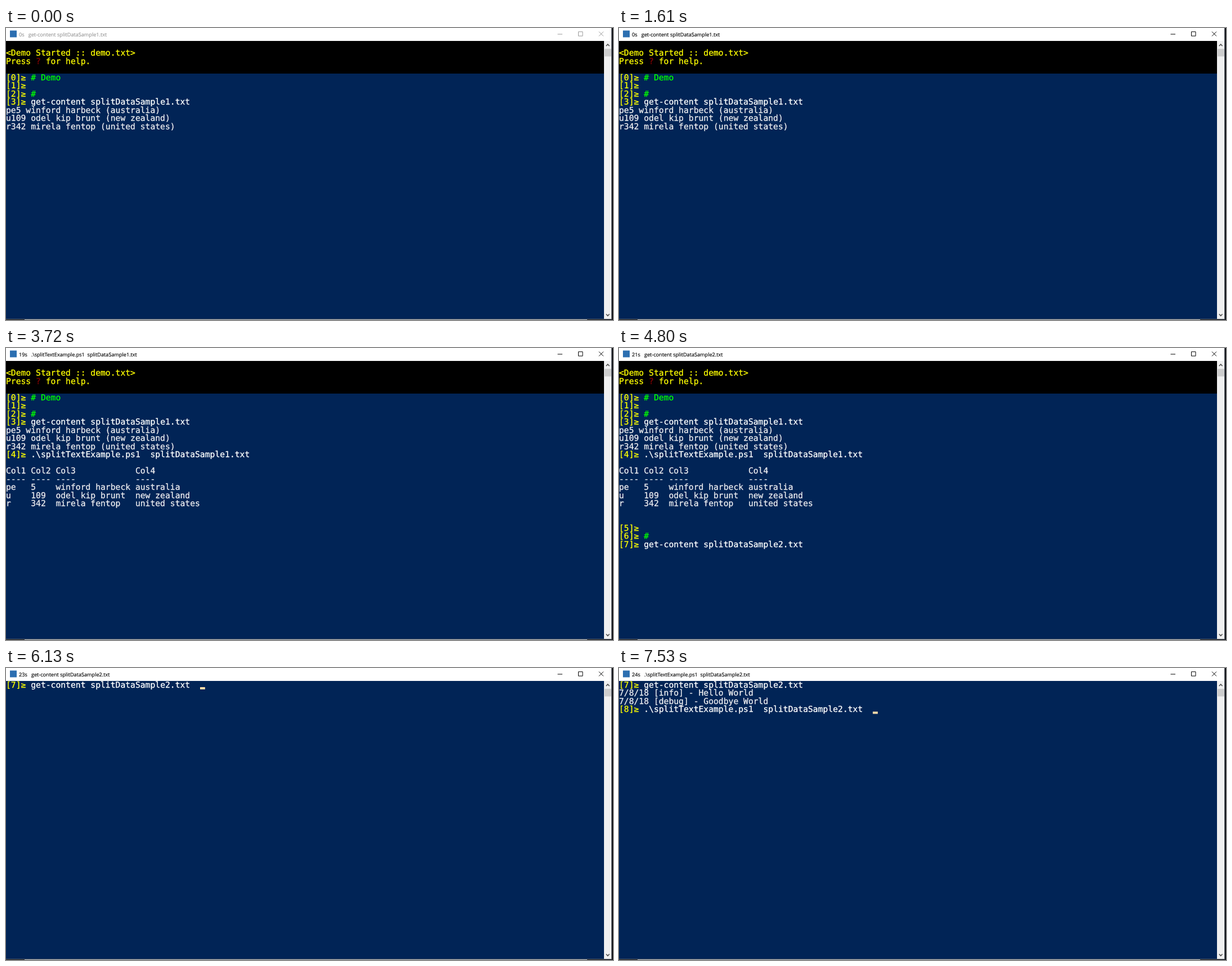
Animation of 1079 by 519 pixels, one loop 8000 ms. Source, as an HTML page:

```html
<!DOCTYPE html>
<html lang="en">
<head>
<meta charset="utf-8">
<title>Console demo</title>
<style>
  html, body { margin: 0; width: 100%; height: 100%; overflow: hidden; background: #012456; }
  svg { display: block; width: 1079px; height: 519px; }
  text { white-space: pre; text-rendering: geometricPrecision; }
  #rows { font: 14.694px "DejaVu Sans Mono", monospace; stroke-width: .3; }
  #title { font: 9.15px "Open Sans", "Noto Sans", sans-serif; stroke-width: .15; }
  tspan, #title { fill: currentColor; stroke: currentColor; }
  .out { color: #eeedf0; }
  .cmd { color: #fff; }
  .yellow { color: #ff0; }
  .green { color: #0f0; }
  .red { color: #800000; }
</style>
</head>
<body>
<svg viewBox="0 0 1079 519">
  <rect width="1079" height="519" fill="#15171c"/>
  <rect width="1077" height="518" fill="#5c626b"/>
  <rect width="1076" height="23" fill="#fff"/>
  <rect y="23" width="1063" height="494" fill="#012456"/>
  <rect id="banner" y="23" width="1063" height="58"/>
  <rect x="33" y="518" width="1000" height="1" fill="#b4b8bd"/>

  <rect x="7" y="4.5" width="12" height="12" fill="#2c6fb1"/>
  <text id="title" x="23" y="14.5"></text>
  <path id="buttons" fill="none" d="M980.5 11h8.5M1017.500 6.700h7.500v7.500h-7.500zM1054 6.500l8 8m0-8l-8 8"/>

  <rect x="1063" y="23" width="13" height="494" fill="#f0f0f0"/>
  <rect x="1064" y="37" width="12" height="13.5" fill="#cdcdcd"/>
  <path d="M1066.800 32l2.900-3 2.900 3M1066.800 508.500l2.900 3 2.900-3" fill="none" stroke="#505050" stroke-width="1.6"/>

  <g id="rows"></g>
  <rect id="caret" width="8.846" height="4" fill="#fedba9"/>
  <path id="mouse" d="M.5.5v12.300l2.800-2.600 2 4.400 1.900-.9-2-4.200h3.500z" fill="#fff" stroke="#000" stroke-width=".7"/>
</svg>
<script>
const LOOP = 8000, CELL = 8.846, ROW = 14.5, BASELINE = 34.6;
const byId = id => document.getElementById(id);
const escapeText = s => s.replace(/&/g, "&amp;").replace(/</g, "&lt;");

// A row is a list of [class, text] runs.
const out = text => [["out", text]];
const prompt = (n, text = "", kind = "cmd") => [["yellow", `[${n}]≥ `], [kind, text]];
const show = n => `get-content splitDataSample${n}.txt`;
const split = n => `.\\splitTextExample.ps1  splitDataSample${n}.txt`;

const people = [
  ["pe", "5", "winford harbeck", "australia"],
  ["u", "109", "odel kip brunt", "new zealand"],
  ["r", "342", "mirela fentop", "united states"]
];
const tableRow = ([a, b, c, d]) =>
  out(a.padEnd(5) + b.padEnd(5) + c.padEnd(16) + d);

const start = [
  [],
  [["yellow", "<Demo Started :: demo.txt>"]],
  [["yellow", "Press "], ["red", "?"], ["yellow", " for help."]],
  [],
  prompt(0, "# Demo", "green"),
  prompt(1),
  prompt(2, "#", "green"),
  prompt(3, show(1)),
  ...people.map(([a, b, c, d]) => out(`${a}${b} ${c} (${d})`))
];
const command = [...start, prompt(4, split(1))];
const table = [
  ...command, [],
  tableRow(["Col1", "Col2", "Col3", "Col4"]),
  tableRow(["----", "----", "----", "----"]),
  ...people.map(tableRow)
];
const second = [...table, [], [], prompt(5), prompt(6, "#", "green"), prompt(7, show(2))];
const cleared = [prompt(7, show(2))];
const log = [...cleared, out("7/8/18 [info] - Hello World"), out("7/8/18 [debug] - Goodbye World")];
const last = [...log, prompt(8, split(2))];

const screens = [
  [0, start, "0s   " + show(1)],
  [1860, command, "19s   " + split(1)],
  [2790, table, "19s   " + split(1)],
  [4100, second, "21s   " + show(2)],
  [6130, cleared, "23s   " + show(2)],
  [6830, log, "23s   " + show(2)],
  [7530, last, "24s   " + split(2)]
];

// [time, column, row]; no column means hidden
const carets = [
  [0], [1080, 0, 11], [1610], [1860, 51, 11], [2620, 0, 12], [2790, 0, 20], [3720],
  [4100, 39, 22], [4800], [5260, 39, 22], [5810], [6130, 39, 0], [6830, 0, 3],
  [7380], [7530, 51, 3]
];

// [time, x, y]; no x means hidden
const mousePath = [[0], [450, 672, 505], [530, 675, 465], [760, 698, 383], [840, 701, 378], [910]];

const at = (steps, t) => steps.findLast(step => step[0] <= t);

function place(id, x, y) {
  const style = byId(id).style;
  style.display = x === undefined ? "none" : "";
  if (x !== undefined) style.transform = `translate(${x}px, ${y}px)`;
}

let shown;
function drawScreen(screen) {
  if (screen === shown) return;
  shown = screen;
  const [, rows, title] = screen;
  byId("title").textContent = title;
  byId("rows").innerHTML = rows.map((runs, i) =>
    `<text y="${BASELINE + i * ROW}">` +
    runs.map(([kind, text]) => `<tspan class="${kind}">${escapeText(text)}</tspan>`).join("") +
    "</text>").join("");
  byId("banner").style.display = rows.length >= start.length ? "" : "none";
}

function draw(t) {
  drawScreen(at(screens, t));
  const ink = t < 70 ? "#999" : "#000";
  byId("title").style.color = ink;
  byId("buttons").style.stroke = ink;
  const [, col, row] = at(carets, t);
  place("caret", col === undefined ? col : col * CELL, 34 + row * ROW);
  const [, x, y] = at(mousePath, t);
  place("mouse", x, y);
}

const begin = performance.now();
function tick() {
  draw((performance.now() - begin) % LOOP);
  requestAnimationFrame(tick);
}
tick();
</script>
</body>
</html>
```
